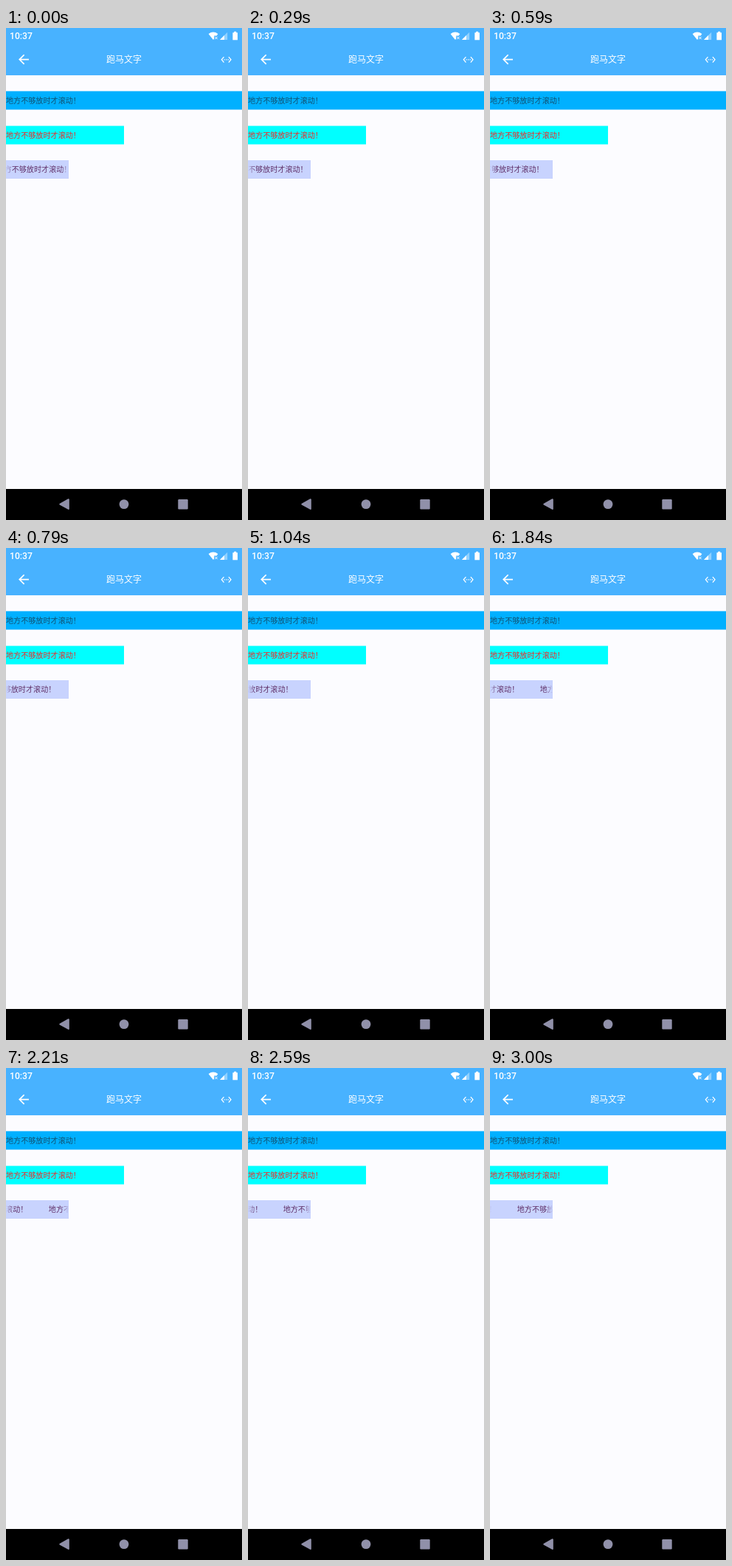
An HTML page with a canvas that plays this animation: 320x666 px, repeating every 3040 ms.

```html
<!DOCTYPE html>
<html lang="zh-CN">
<head>
<meta charset="utf-8">
<title>跑马文字</title>
<style>
html, body { margin: 0; width: 100%; height: 100%; overflow: hidden; background: #fcfcff; }
canvas { display: block; width: 320px; height: 666px; }
</style>
</head>
<body>
<canvas id="stage"></canvas>
<script>
const W = 320, H = 666, LOOP = 3040;
const CJK = '"Noto Sans CJK SC", "Noto Sans CJK", sans-serif';
const MESSAGE = '地方不够放时才滚动！';
const BOX = 85, FADE = 9.3, SPEED = 26.7 / 1000, START = -12.5;
const canvas = document.getElementById('stage');
const ctx = canvas.getContext('2d');
const dpr = window.devicePixelRatio || 1;
canvas.width = W * dpr;
canvas.height = H * dpr;

const arrow = new Path2D('M20 11H7.83l5.59-5.59L12 4l-8 8 8 8 1.41-1.41L7.83 13H20v-2z');
const code = new Path2D('M7.77 6.76L6.23 5.48.82 12l5.41 6.52 1.54-1.28L3.42 12l4.35-5.24z' +
  'M7 13h2v-2H7v2zm10-2h-2v2h2v-2zm-6 2h2v-2h-2v2z' +
  'm6.77-7.52l-1.54 1.28L20.58 12l-4.35 5.24 1.54 1.28L23.18 12l-5.41-6.52z');
const wifi = new Path2D('M274.6 8Q281 3.2 287.4 8L285.6 10.4H282.2V14.6L281 16z');
const battery = new Path2D('M307.4 6.2H309.2V4.8H312.2V6.2H314V16.2H307.4z');

function rect(color, x, y, w, h) {
  ctx.fillStyle = color;
  ctx.fillRect(x, y, w, h);
}

function text(str, x, y, font, color) {
  ctx.font = font;
  ctx.fillStyle = color;
  ctx.fillText(str, x, y);
}

function icon(path, cx, cy, scale) {
  ctx.save();
  ctx.translate(cx, cy);
  ctx.scale(scale, scale);
  ctx.translate(-12, -12);
  ctx.fillStyle = '#fff';
  ctx.fill(path);
  ctx.restore();
}

function poly(color, ...pts) {
  ctx.fillStyle = color;
  ctx.beginPath();
  pts.forEach(([x, y]) => ctx.lineTo(x, y));
  ctx.closePath();
  ctx.fill();
}

function statusBar() {
  text('10:37', 5, 15.2, '500 12.2px Roboto, sans-serif', '#fff');
  ctx.fill(wifi);
  ctx.strokeStyle = '#fff';
  ctx.lineWidth = 1;
  ctx.beginPath();
  ctx.moveTo(283.3, 11.8); ctx.lineTo(286.7, 15.2);
  ctx.moveTo(286.7, 11.8); ctx.lineTo(283.3, 15.2);
  ctx.stroke();
  poly('rgba(255,255,255,.4)', [290, 16], [300.2, 5.8], [300.2, 16]);
  poly('#fff', [290, 16], [296, 10], [296, 16]);
  ctx.fill(battery);
}

function navBar() {
  const grey = '#9090a9';
  rect('#000', 0, 624, W, 42);
  ctx.lineJoin = 'round';
  ctx.lineWidth = 2;
  ctx.strokeStyle = grey;
  poly(grey, [73.3, 644.6], [84.8, 638.2], [84.8, 651]);
  ctx.stroke();
  ctx.beginPath();
  ctx.arc(160, 644.6, 6.4, 0, 7);
  ctx.fill();
  ctx.beginPath();
  ctx.roundRect(233.3, 638, 13.4, 13.4, 1.2);
  ctx.fill();
}

function marquee(t) {
  const font = '10.1px ' + CJK;
  const x = START - SPEED * t;
  const ink = a => `rgba(96,48,104,${a})`;
  const fade = ctx.createLinearGradient(0, 0, BOX, 0);
  fade.addColorStop(0, ink(0));
  fade.addColorStop(FADE / BOX, ink(1));
  fade.addColorStop(1 - FADE / BOX, ink(1));
  fade.addColorStop(1, ink(0));
  rect('#c8d3fe', 0, 179, BOX, 25);
  ctx.save();
  ctx.beginPath();
  ctx.rect(0, 179, BOX, 25);
  ctx.clip();
  text(MESSAGE, x, 195.4, font, fade);
  // the next copy follows after a third of the box width
  text(MESSAGE, x + 101 + BOX / 3, 195.4, font, fade);
  ctx.restore();
}

function draw(t) {
  const font = '10.1px ' + CJK;
  ctx.setTransform(dpr, 0, 0, dpr, 0, 0);
  rect('#fcfcff', 0, 0, W, H);
  rect('#48b2ff', 0, 0, W, 64);
  statusBar();
  icon(arrow, 24, 42.6, 0.87);
  icon(code, 298.7, 42.8, 0.64);
  text('跑马文字', 136, 46.7, '12px ' + CJK, '#fff');
  rect('#00b0ff', 0, 85.5, W, 25);
  text(MESSAGE, 0, 101.9, font, '#12506e');
  rect('#00ffff', 0, 132.5, 160, 25);
  text(MESSAGE, 0, 148.9, font, '#f02828');
  marquee(t);
  navBar();
}

const begin = performance.now();
function tick() {
  draw((performance.now() - begin) % LOOP);
  requestAnimationFrame(tick);
}
tick();
</script>
</body>
</html>
```
